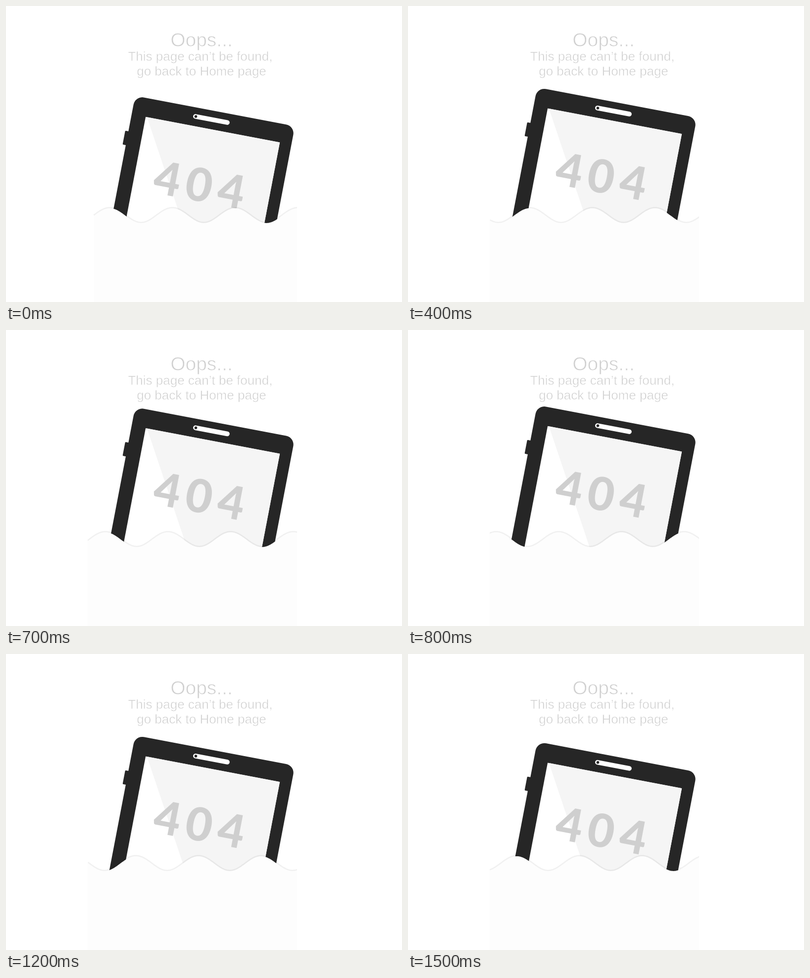
Write an HTML page with a canvas that moves like this. It is 800x600 px and loops after 1600 ms.

```html
<!DOCTYPE html>
<html lang="en">
<head>
<meta charset="utf-8">
<title>Page not found</title>
<style>
  html, body { margin: 0; width: 100%; height: 100%; overflow: hidden; background: #fff; }
  canvas, svg { position: absolute; left: 0; top: 0; }
  /* The white stroke thins the letters to a light weight. */
  text {
    font-family: "Liberation Sans", Arial, sans-serif;
    fill: #d0d0d0; stroke: #fff; stroke-width: 0.024em; text-anchor: middle;
  }
  .title { font-size: 39px; }
  .line { font-size: 26px; }
</style>
</head>
<body>
<canvas id="stage" width="800" height="600"></canvas>
<svg width="800" height="600">
  <text class="title" x="395" y="81.5">Oops...</text>
  <text class="line" x="392.4" y="111.3">This page can’t be found,</text>
  <text class="line" x="395" y="141.3">go back to Home page</text>
</svg>
<script>
const ctx = document.getElementById('stage').getContext('2d');
const LOOP = 1600, HALF = 7, RISE = 30;
const TILT = 10.8 * Math.PI / 180;
const DARK = '#262626';
const SEA = { left: 165, right: 588, start: 178, mid: 424.9, amp: 15, period: 126.6 };

function roundBox(x, y, w, h, r, color) {
  ctx.fillStyle = color;
  ctx.beginPath();
  ctx.roundRect(x, y, w, h, r);
  ctx.fill();
}

// Local origin is the top left corner of the screen.
function drawTablet(y) {
  ctx.save();
  ctx.translate(282, y);
  ctx.rotate(TILT);
  roundBox(-35, 36, 12, 28.5, 1.5, DARK);
  roundBox(-28.5, -37.3, 328.5, 420, 18, DARK);
  roundBox(94.2, -23.8, 75, 9.6, 4.8, '#fff');
  roundBox(96.9, -21.8, 5.6, 5.6, 2.8, DARK);
  roundBox(0.3, 0.7, 275.9, 360, 0, '#fff');

  ctx.fillStyle = '#f5f5f5';
  ctx.beginPath();
  ctx.moveTo(3, 0.7);
  ctx.lineTo(276.2, 0.7);
  ctx.lineTo(276.2, 300);
  ctx.lineTo(171, 300);
  ctx.closePath();
  ctx.fill();

  ctx.fillStyle = '#cfcfcf';
  ctx.font = '800 93px Lato, Inter, sans-serif';
  ctx.textAlign = 'center';
  ctx.fillText('4', 67.6, 148.7);
  ctx.fillText('0', 132.3, 148.7);
  ctx.fillText('4', 198.5, 148.7);
  ctx.restore();
}

function drawSea(shift) {
  const left = SEA.start + shift;
  ctx.save();
  ctx.beginPath();
  ctx.rect(SEA.left, 0, SEA.right - SEA.left, 600);
  ctx.clip();

  ctx.beginPath();
  for (let x = Math.max(left, SEA.left); x <= SEA.right + 2; x++) {
    ctx.lineTo(x, SEA.mid - SEA.amp * Math.sin((x - left) / SEA.period * 2 * Math.PI));
  }
  ctx.strokeStyle = 'rgba(0, 0, 0, 0.06)';
  ctx.lineWidth = 5;
  ctx.stroke();
  ctx.lineTo(SEA.right + 2, 600);
  ctx.lineTo(Math.max(left, SEA.left), 600);
  ctx.closePath();
  ctx.fillStyle = '#fdfdfd';
  ctx.fill();
  ctx.restore();
}

// Motion runs in 100 ms steps, with two of them held twice as long.
function stepAt(time) {
  const slot = Math.floor(time % LOOP / 100);
  return slot - (slot >= 6) - (slot >= 9);
}

function draw(time) {
  const step = stepAt(time);
  const lift = RISE * (1 - Math.abs(step - HALF) / HALF);
  const drift = -22.6 * Math.min(step, HALF) - 14.15 * Math.max(step - HALF, 0);
  ctx.fillStyle = '#fff';
  ctx.fillRect(0, 0, 800, 600);
  drawTablet(224 - lift);
  drawSea(drift);
}

let begin;
function tick(now) {
  begin ??= now;
  draw(now - begin);
  requestAnimationFrame(tick);
}
draw(0);
requestAnimationFrame(tick);
</script>
</body>
</html>
```
